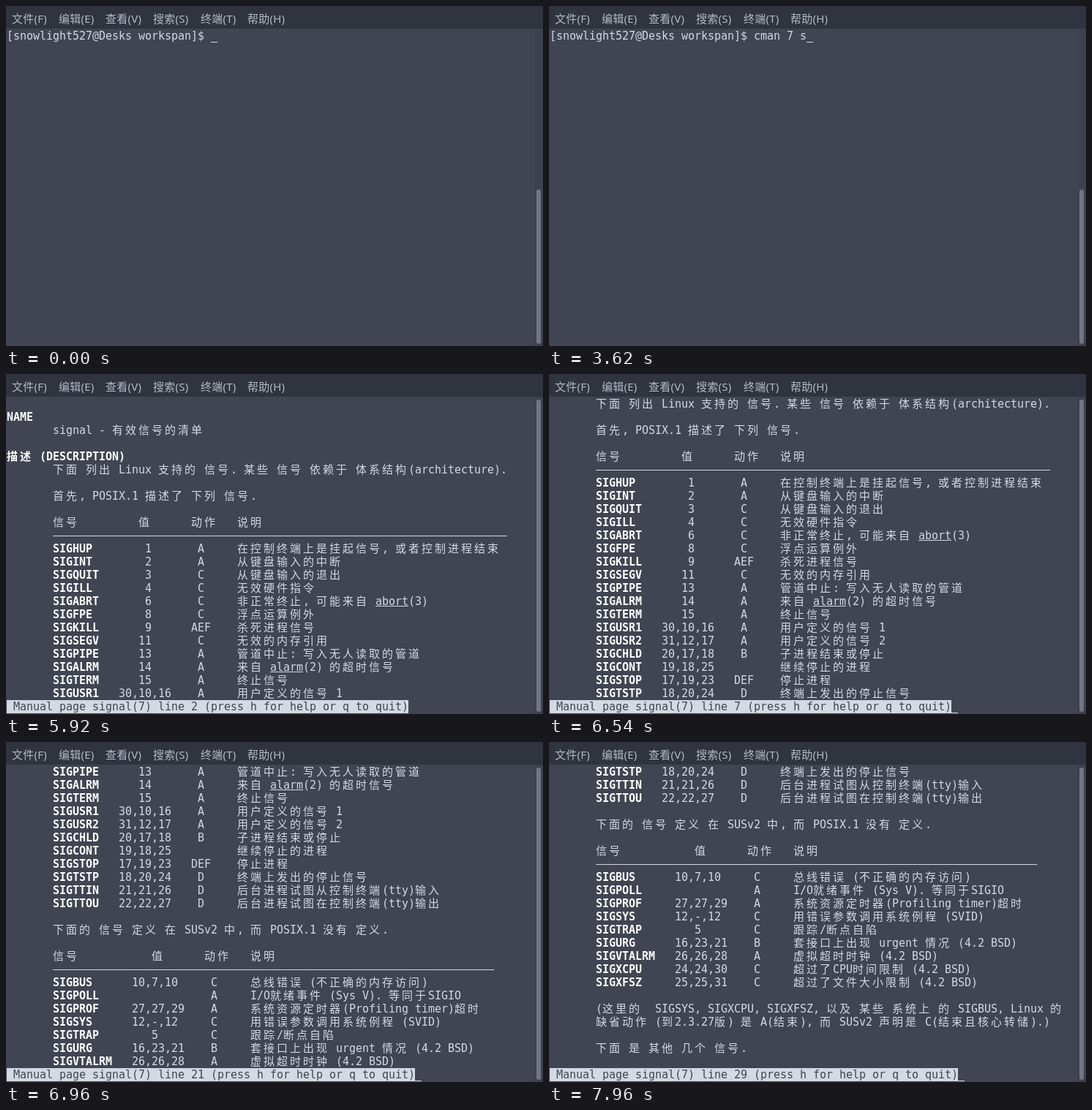
Recreate the animation shown at these times as an HTML page. Size 734 px wide and 465 px high, loop 7990 ms.

```html
<!DOCTYPE html>
<html lang="zh-CN">
<head>
<meta charset="utf-8">
<title>Terminal</title>
<style>
html, body { margin: 0; width: 100%; height: 100%; overflow: hidden; background: #404551; }
#stage { position: relative; width: 734px; height: 465px; overflow: hidden; background: #404551; }
#stage div, #stage span { position: absolute; white-space: pre; }
#menu { left: 0; top: 0; width: 734px; height: 31px; background: #2f343f; color: #b4bac4;
  font: 15px/20px "Noto Sans", "Noto Sans CJK SC", sans-serif; }
#menu span { top: 7px; letter-spacing: .25px; }
#trough { left: 722px; top: 31px; width: 12px; height: 434px; background: #3d424e; }
#thumb { left: 725px; width: 6px; border-radius: 3px; background: #717682; }
.term { color: #d3dae3; font: 15px/18px "DejaVu Sans Mono", "Noto Sans CJK SC", monospace;
  letter-spacing: calc(9px - 1ch); }
#prompt { left: 1px; top: 32px; }
#view { left: 1px; top: 32px; width: 721px; height: 414px; overflow: hidden; }
#doc { left: 0; top: 0; width: 721px; }
.line { left: 0; height: 18px; width: 721px; }
.cjk { letter-spacing: 3px; }
.b { font-weight: bold; color: #fff; }
.u { text-decoration: underline 1px; text-underline-offset: 1px; text-decoration-skip-ink: none; }
.rule { height: 1px; background: #d3dae3; }
#status { left: 1px; top: 446px; height: 18px; background: #d3dae3; color: #404551; }
#cursor { width: 9px; height: 1px; background: #d3dae3; }
</style>
</head>
<body>
<div id="stage">
  <div id="menu"></div>
  <div id="trough"></div>
  <div id="thumb"></div>
  <div id="prompt" class="term"></div>
  <div id="view" class="term"><div id="doc"></div></div>
  <div id="status" class="term"></div>
  <div id="cursor"></div>
</div>
<script>
const CELL = 9, ROW = 18, LOOP = 7990;
const PROMPT = '[snowlight527@Desks workspan]$ ';
const COMMAND = 'cman 7 signal';
const $ = id => document.getElementById(id);

function add(parent, tag, cls, left, text = '') {
  const el = document.createElement(tag);
  el.className = cls;
  el.style.left = left + 'px';
  el.textContent = text;
  parent.append(el);
  return el;
}

const menu = { 8: '文件(F)', 72: '编辑(E)', 136: '查看(V)', 201: '搜索(S)', 266: '终端(T)', 330: '帮助(H)' };
for (const x in menu) add($('menu'), 'span', '', x, menu[x]);

// Wide characters take two cells; *bold* and _underline_ mark styles.
function put(line, col, text) {
  for (const part of text.split(/(\*[^*]+\*|_[^_]+_)/)) {
    const style = { '*': 'b', '_': 'u' }[part[0]] || '';
    const body = style ? part.slice(1, -1) : part;
    for (const run of body.match(/[\u4e00-\u9fff]+|[^\u4e00-\u9fff]+/g) || []) {
      const wide = run.charCodeAt(0) >= 0x4e00;
      add(line, 'span', style + (wide ? ' cjk' : ''), col * CELL, run);
      col += run.length * (wide ? 2 : 1);
    }
  }
}

let count = 0;
function newLine(...cells) {
  const line = add($('doc'), 'div', 'line', 0);
  line.style.top = count++ * ROW + 'px';
  for (let i = 0; i < cells.length; i += 2) put(line, cells[i], cells[i + 1]);
  return line;
}

function table(shift, valueCol, ruleEnd, rows) {
  newLine(7, '信号', 20 + shift, '值', 28 + shift, '动作', 35 + shift, '说明');
  const rule = add(newLine(), 'div', 'rule', 7 * CELL);
  rule.style.top = '9px';
  rule.style.width = (ruleEnd - 7) * CELL + 'px';
  for (const row of rows.trim().split('\n')) {
    const [name, value, action, note] = row.trim().split('|');
    newLine(7, `*SIG${name}*`,
      Math.floor(valueCol + (8 - value.length) / 2), value,
      28 + shift + Math.floor((3 - action.length) / 2), action,
      35 + shift, note);
  }
}

newLine(0, 'SIGNAL(7)', 27, "Linux Programmer's Manual", 69, 'SIGNAL(7)');
newLine();
newLine(0, '*NAME*');
newLine(7, 'signal - 有效信号的清单');
newLine();
newLine(0, '*描述 (DESCRIPTION)*');
newLine(7, '下面 列出 Linux 支持的 信号. 某些 信号 依赖于 体系结构(architecture).');
newLine();
newLine(7, '首先, POSIX.1 描述了 下列 信号.');
newLine();
table(0, 17.5, 76, `
  HUP|1|A|在控制终端上是挂起信号, 或者控制进程结束
  INT|2|A|从键盘输入的中断
  QUIT|3|C|从键盘输入的退出
  ILL|4|C|无效硬件指令
  ABRT|6|C|非正常终止, 可能来自 _abort_(3)
  FPE|8|C|浮点运算例外
  KILL|9|AEF|杀死进程信号
  SEGV|11|C|无效的内存引用
  PIPE|13|A|管道中止: 写入无人读取的管道
  ALRM|14|A|来自 _alarm_(2) 的超时信号
  TERM|15|A|终止信号
  USR1|30,10,16|A|用户定义的信号 1
  USR2|31,12,17|A|用户定义的信号 2
  CHLD|20,17,18|B|子进程结束或停止
  CONT|19,18,25||继续停止的进程
  STOP|17,19,23|DEF|停止进程
  TSTP|18,20,24|D|终端上发出的停止信号
  TTIN|21,21,26|D|后台进程试图从控制终端(tty)输入
  TTOU|22,22,27|D|后台进程试图在控制终端(tty)输出`);
newLine();
newLine(7, '下面的 信号 定义 在 SUSv2 中, 而 POSIX.1 没有 定义.');
newLine();
table(2, 19, 74, `
  BUS|10,7,10|C|总线错误 (不正确的内存访问)
  POLL||A|I/O就绪事件 (Sys V). 等同于SIGIO
  PROF|27,27,29|A|系统资源定时器(Profiling timer)超时
  SYS|12,-,12|C|用错误参数调用系统例程 (SVID)
  TRAP|5|C|跟踪/断点自陷
  URG|16,23,21|B|套接口上出现 urgent 情况 (4.2 BSD)
  VTALRM|26,26,28|A|虚拟超时时钟 (4.2 BSD)
  XCPU|24,24,30|C|超过了CPU时间限制 (4.2 BSD)
  XFSZ|25,25,31|C|超过了文件大小限制 (4.2 BSD)`);
newLine();
newLine(7, '(这里的  SIGSYS, SIGXCPU, SIGXFSZ, 以及 某些 系统上 的 SIGBUS, Linux 的');
newLine(7, '缺省动作 (到2.3.27版) 是 A(结束), 而 SUSv2 声明是 C(结束且核心转储).)');
newLine();
newLine(7, '下面 是 其他 几个 信号.');
newLine();

const keys = [910, 1060, 1170, 1510, 1770, 2750, 3070, 3620, 3750, 3940, 4290, 4400, 4520];
const CLEAR = 4910, OPEN = 4930;

function topLine(t) {
  if (t < 5920) return 1;
  if (t < 6420) return 2;
  if (t < 7090) return Math.min(22, 3 + Math.floor((t - 6420) / 30));
  if (t < 7340) return 23;
  if (t < 7840) return 24;
  return Math.min(29, 25 + Math.floor((t - 7840) / 30));
}

const show = (el, on) => { el.style.visibility = on ? 'visible' : 'hidden'; };

function draw(t) {
  const paging = t >= OPEN, cleared = t >= CLEAR;
  const typed = PROMPT + COMMAND.slice(0, keys.filter(k => k <= t).length);
  const top = topLine(t);
  const status = ` Manual page signal(7) line ${top} (press h for help or q to quit)`;

  $('prompt').textContent = typed;
  show($('prompt'), !cleared);
  show($('view'), paging);
  show($('status'), paging);
  $('doc').style.top = (1 - top) * ROW + 'px';
  $('status').textContent = status;
  $('status').style.width = status.length * CELL + 'px';

  $('thumb').style.top = (cleared ? 35 : 251) + 'px';
  $('thumb').style.height = (cleared ? 427 : 211) + 'px';

  const blinkOn = t < 3750 || (t >= 6420 && t < 7090) || t >= 7840;
  show($('cursor'), blinkOn);
  $('cursor').style.left = 1 + (paging ? status : typed).length * CELL + 'px';
  $('cursor').style.top = (paging ? 463 : 49) + 'px';
}

const start = performance.now();
function tick() {
  draw((performance.now() - start) % LOOP);
  requestAnimationFrame(tick);
}
tick();
</script>
</body>
</html>
```
